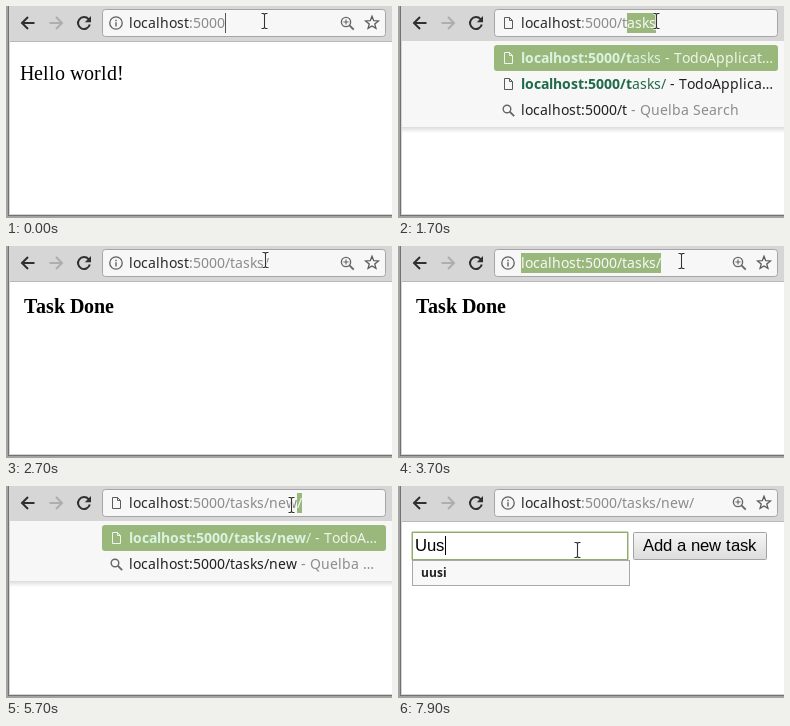
Write an HTML page that moves like this. It is 386x212 px and loops after 8000 ms.

```html
<!DOCTYPE html>
<html lang="en">
<head>
<meta charset="utf-8">
<title>Todo app in a browser</title>
<style>
  html, body { margin: 0; width: 100%; height: 100%; overflow: hidden; background: #fff; }
  svg { display: block; width: 386px; height: 212px; }
  text { white-space: pre; }
</style>
</head>
<body>
<svg id="stage" viewBox="0 0 386 212" xmlns="http://www.w3.org/2000/svg"></svg>
<script>
const LOOP = 8000;
const GREEN = '#9ab87c', INK = '#2a2a2a', GREY = '#8c8c8c', LINK = '#20694a';
const DOMAIN = 'localhost', HOST = DOMAIN + ':5000';
const TASKS = HOST + '/tasks', NEW = TASKS + '/new/';
const TITLE = 'TodoApplication', ENGINE = 'Quelba Search';
const URL_X = 123, MENU_END = 375;

const UI = { family: "'Noto Sans', 'Open Sans', sans-serif", size: 14, weight: 400 };
const UI_BOLD = { ...UI, weight: 700 };
const HINT = { ...UI_BOLD, size: 12 };
const SERIF = { family: "'Liberation Serif', 'Times New Roman', serif", size: 20, weight: 400, kern: true };
const HEAD = { ...SERIF, weight: 700 };
const FORM = { family: "'Liberation Sans', Arial, sans-serif", size: 16.667, weight: 400 };

const pen = document.createElement('canvas').getContext('2d');

function measure(str, font) {
  pen.font = `${font.weight} ${font.size}px ${font.family}`;
  return pen.measureText(str).width;
}

// Letters advance by whole pixels, as in hinted text; page text is also kerned.
function steps_of(str, font) {
  return [...str].map((ch, i) => {
    const next = font.kern && str[i + 1] || '';
    return Math.round(measure(ch + next, font) - measure(next, font));
  });
}

const advance = (str, font) => steps_of(str, font).reduce((a, b) => a + b, 0);

function text(x, y, str, font, fill) {
  if (!str) return '';
  const xs = steps_of(str, font).map(w => (x += w) - w);
  return `<text xml:space="preserve" x="${xs.join(' ')}" y="${y}" fill="${fill}"
    font-family="${font.family}" font-size="${font.size}" font-weight="${font.weight}">${str}</text>`;
}

// Draws [string, font, colour] runs one after another.
function runs(x, y, list) {
  return list.map(([str, font, fill]) => {
    const part = text(x, y, str, font, fill);
    x += advance(str, font);
    return part;
  }).join('');
}

const rect = (x, y, w, h, fill, more = '') =>
  `<rect x="${x}" y="${y}" width="${w}" height="${h}" fill="${fill}" ${more}/>`;
const box = (x, y, w, h, fill, stroke, r = 0) =>
  rect(x + .5, y + .5, w - 1, h - 1, fill, `stroke="${stroke}" rx="${r}"`);
const line = (d, stroke, width = 1, fill = 'none') =>
  `<path d="${d}" fill="${fill}" stroke="${stroke}" stroke-width="${width}"/>`;
const at = (x, y, body) => `<g transform="translate(${x} ${y})">${body}</g>`;
const fade = (id, from, to) =>
  `<linearGradient id="${id}" x2="0" y2="1"><stop stop-color="${from}"/>` +
  `<stop offset="1" stop-color="${to}"/></linearGradient>`;

const docIcon = (y, color) =>
  at(106, y - 6, line('M.5 .5h5l3 3v8h-8zM5.5 .5v3h3', color));

const lens = (x, y, r, color, plus) => at(x, y,
  `<circle r="${r}" fill="none" stroke="${color}" stroke-width="1.4"/>` +
  line(`M${r * .7} ${r * .7}L${r * .7 + 4.5} ${r * .7 + 4.5}`, color, 1.8) +
  (plus ? line('M-2.5 0h5M0 -2.5v5', color, 1.1) : ''));

const infoIcon = at(110, 17,
  '<circle r="6.2" fill="none" stroke="#5f5f5f" stroke-width="1.3"/>' +
  line('M0 -3.3v1.5M0 -.7v4.2', '#5f5f5f', 1.4));

const starPath = () => {
  const pts = Array.from({ length: 10 }, (_, i) => {
    const a = -Math.PI / 2 + i * Math.PI / 5, r = i % 2 ? 2.9 : 6.7;
    return `${(r * Math.cos(a)).toFixed(2)} ${(r * Math.sin(a)).toFixed(2)}`;
  });
  return `M${pts.join('L')}z`;
};

const arrowIcon = (x, dir, color) =>
  at(x, 17, `<g transform="scale(${dir} 1)">${line('M6.5 0H-5.5M0 -6L-6 0L0 6', color, 2)}</g>`);

const frame =
  rect(0, 0, 386, 212, '#a3a3a3') +
  rect(2, 0, 384, 210, '#727272') +
  rect(3, 0, 383, 209, '#d6d6d6') +
  rect(4, 35, 382, 173, '#fff') +
  rect(4, 35, 382, 1, '#b8b8b8') +
  arrowIcon(22, 1, '#303030') + arrowIcon(50, -1, '#adadad') +
  at(78, 17, line('M4.6 -3.9A6 6 0 1 0 5.8 1.6', '#303030', 2) +
    '<path d="M7 -7v6.2h-6.2z" fill="#303030"/>') +
  box(96, 3, 284, 28, '#f7f7f7', '#a6a6a6', 3);

const pageTools = infoIcon + lens(340, 16, 4.6, '#666', true) +
  at(366, 17, line(starPath(), '#5c5c5c', 1.3));

function addressBar(s) {
  const full = s.url + s.auto;
  const end = URL_X + advance(full, UI);
  let out = s.menu.length ? docIcon(17, '#5a5a5a') : pageTools;
  if (s.selected) {
    return out + rect(URL_X, 7, end - URL_X, 20, GREEN) + text(URL_X, 22, full, UI, '#f7f7f7');
  }
  const typedEnd = URL_X + advance(s.url, UI);
  if (s.auto) out += rect(typedEnd, 7, end - typedEnd, 20, GREEN);
  out += runs(URL_X, 22, [
    [DOMAIN, UI, INK], [s.url.slice(DOMAIN.length), UI, GREY], [s.auto, UI, '#f7f7f7']
  ]);
  if (s.caret >= 0) {
    out += rect(URL_X + advance(s.url.slice(0, s.caret), UI), 7, 1, 20, '#555');
  }
  return out;
}

function fit(str, x) {
  if (x + advance(str, UI) <= MENU_END) return str;
  while (x + advance(str + '…', UI) > MENU_END) str = str.slice(0, -1);
  return str + '…';
}

function menuRow(typed, target, i) {
  const y = 39 + 26 * i, on = i === 0;
  const bold = target.slice(0, typed.length), rest = target.slice(typed.length);
  const urlColor = on ? '#d8f3df' : LINK;
  const titleX = URL_X + advance(bold, UI_BOLD) + advance(rest + ' - ', UI);
  return (on ? rect(96, y, 284, 26, GREEN, 'rx="3"') : '') +
    docIcon(y + 13, on ? '#f2f5ee' : '#5a5a5a') +
    runs(URL_X, y + 18, [
      [bold, UI_BOLD, urlColor], [rest, UI, urlColor],
      [' - ' + fit(TITLE, titleX), UI, on ? '#f0f4eb' : '#222']
    ]);
}

function menu(s) {
  const n = s.menu.length;
  if (!n) return '';
  const y = 39 + 26 * n, bottom = y + 30;
  const engineX = URL_X + advance(s.url + ' - ', UI);
  return fade('shade', '#dcdcdc', '#fff') +
    rect(4, bottom, 382, 6, 'url(#shade)') +
    rect(4, 35, 382, bottom - 35, '#f7f7f7') +
    s.menu.map((target, i) => menuRow(s.url, target, i)).join('') +
    lens(109, y + 12, 3.8, '#666') +
    runs(URL_X, y + 18, [[s.url, UI, '#222'], [' - ' + fit(ENGINE, engineX), UI, GREY]]);
}

function form(s) {
  let out = s.focus
    ? box(13, 45, 218, 30, 'none', '#c9d8b9', 1) + box(14, 46, 216, 28, '#fff', '#8fae70')
    : box(14, 46, 216, 28, '#fff', '#9c9c9c');
  out += fade('face', '#f6f6f6', '#dcdcdc') +
    box(235, 46, 134, 28, 'url(#face)', '#a3a3a3', 1) +
    text(245, 65, 'Add a new task', FORM, '#000') +
    text(17, 65, s.value, FORM, '#000');
  if (s.focus) out += rect(Math.round(17 + measure(s.value, FORM)), 50, 1, 19, '#000');
  if (s.hint) out += box(14, 74, 218, 26, '#f8f8f8', '#a8a8a8') + text(23, 91, 'uusi', HINT, '#222');
  return out;
}

const pages = {
  hello: () => text(14, 74, 'Hello world!', SERIF, '#000'),
  done: () => text(18, 67, 'Task Done', HEAD, '#000'),
  form
};

function pointer([x, y, kind]) {
  if (kind === 'arrow') {
    return at(x, y, line('M.7 .8V16.2L4.3 12.9L7.1 19L9.8 17.8L7.1 11.9H12z', '#111', 1.2, '#fff'));
  }
  const beam = 'M-3 .5H-1L0 1.5L1 .5H3M0 1.5V14.5M-3 15.5H-1L0 14.5L1 15.5H3';
  return at(x + .5, y, line(beam, '#fff', 2.4) + line(beam, '#333', 1.1));
}

// Each step changes part of the state and holds until the next one.
const steps = [[0, {
  url: HOST, auto: '', caret: HOST.length, selected: false, menu: [],
  page: 'hello', focus: false, value: '', hint: false, mouse: [258, 7]
}]];
const step = (t, change) => steps.push([t, change]);

function typeUrl(t, url, targets) {
  const auto = targets[0].slice(url.length);
  step(t, { url, auto, caret: auto ? -1 : url.length, menu: targets });
}

step(500, { caret: -1 });
typeUrl(700, HOST + '/', [HOST, TASKS, TASKS + '/']);
step(1200, { caret: -1 });
for (let i = 1; i <= 5; i++) {
  typeUrl(1600 + 100 * i, TASKS.slice(0, HOST.length + 1 + i), [TASKS, TASKS + '/']);
}
step(2300, { url: TASKS + '/', caret: -1, menu: [], page: 'done' });
step(2700, { mouse: [259, 6] });
[[262, 4], [268, 2], [275, 1], [280, 3], [282, 6], [283, 7]]
  .forEach((mouse, i) => step(3200 + 100 * i, { mouse }));
step(3700, { selected: true });
step(3900, { selected: false, caret: TASKS.length });
step(4200, { mouse: [285, 11] });
step(4800, { caret: TASKS.length + 1 });
step(5300, { caret: -1 });
[5400, 5500, 5700].forEach((t, i) => typeUrl(t, NEW.slice(0, TASKS.length + 2 + i), [NEW]));
step(5800, { url: NEW, auto: '', caret: -1, menu: [], page: 'form' });
step(6500, { mouse: [222, 36, 'arrow'] });
step(6600, { mouse: [183, 58] });
step(6700, { mouse: [179, 56] });
step(6900, { focus: true });
step(7500, { value: 'U' });
step(7600, { hint: true });
step(7700, { value: 'Uu' });
step(7900, { value: 'Uus' });

const stage = document.getElementById('stage');
let shown = -1;

function draw(now) {
  const t = now % LOOP;
  const count = steps.filter(([start]) => start <= t).length;
  if (count !== shown) {
    shown = count;
    const s = Object.assign({}, ...steps.slice(0, count).map(([, change]) => change));
    stage.innerHTML = frame + addressBar(s) + pages[s.page](s) + menu(s) + pointer(s.mouse);
  }
}

const begin = performance.now();
function tick() {
  draw(performance.now() - begin);
  requestAnimationFrame(tick);
}
tick();
</script>
</body>
</html>
```
